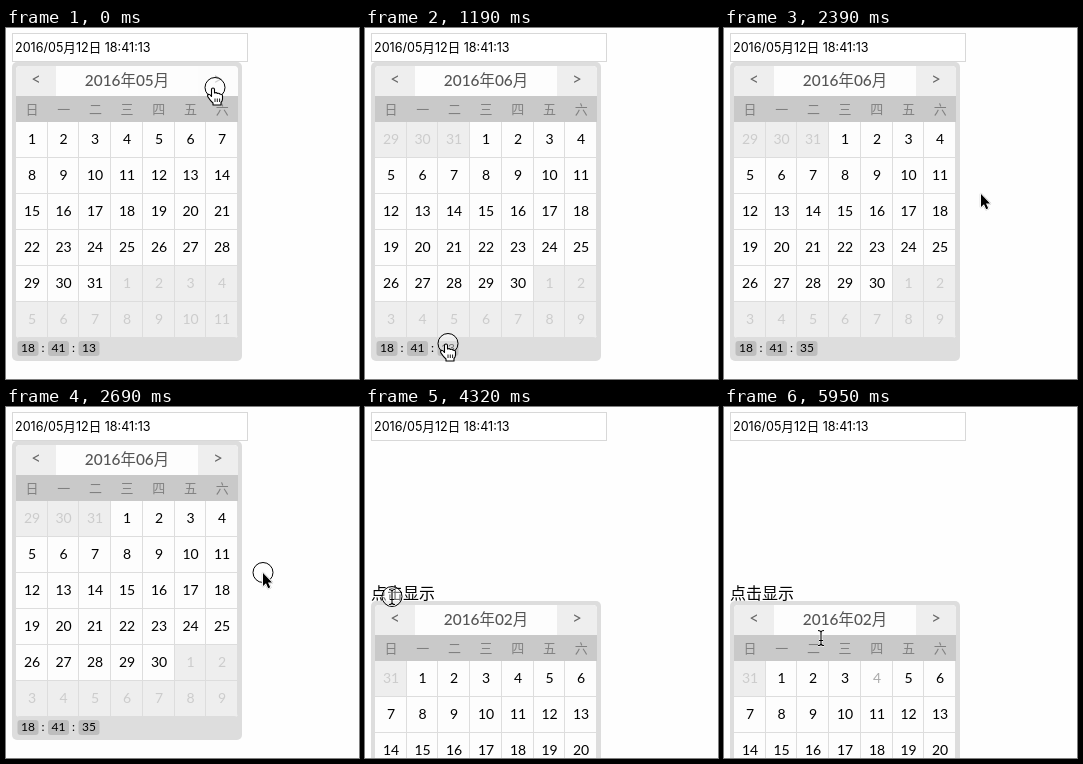
Recreate the animation shown at these times as an HTML page with a canvas. Size 353 by 351 pixels, loop 6.05 s.

```html
<!DOCTYPE html>
<html lang="zh">
<head>
<meta charset="utf-8">
<style>
html, body { margin: 0; height: 100%; overflow: hidden; background: #fefefe; }
canvas { display: block; }
</style>
</head>
<body>
<canvas id="stage" width="353" height="351"></canvas>
<script>
const c = document.getElementById('stage').getContext('2d');
const LOOP = 6050;
const CJK = '"Noto Sans CJK SC", "Noto Sans CJK JP", sans-serif';
const DIGITS = 'Lato, ' + CJK;

// [start ms, pointer, x, y, pressed]
const pointer = [
  [0, 'hand', 209, 60, 1], [150, 'hand', 209, 60], [300, 'hand', 204, 76],
  [440, 'hand', 184, 132], [590, 'hand', 144, 218], [740, 'hand', 104, 292],
  [890, 'hand', 83, 316], [1190, 'hand', 83, 316, 1], [1340, 'hand', 83, 316],
  [1490, 'hand', 96, 167], [1790, 'hand', 96, 167, 1], [1940, 'hand', 96, 167],
  [2090, 'hand', 142, 165], [2240, 'hand', 208, 164], [2390, 'arrow', 257, 166],
  [2690, 'arrow', 257, 166, 1], [2830, 'arrow', 257, 166], [3130, 'arrow', 250, 142],
  [3280, 'arrow', 240, 127], [3430, 'arrow', 91, 204], [3580, 'arrow', 84, 208],
  [3730, 'arrow', 60, 203], [3870, 'arrow', 38, 194], [4020, 'beam', 27, 190],
  [4320, 'beam', 27, 190, 1], [4470, 'beam', 27, 190], [5060, 'hand', 110, 262],
  [5210, 'hand', 169, 318], [5510, 'hand', 169, 318, 1], [5660, 'hand', 169, 318],
  [5950, 'beam', 97, 231]
];

const hand = new Path2D('M-2 7V1.5Q-2 0 -.5 0T1 1.5V5Q3 4 4 5.5Q5.7 4.7 6.6 6.3Q9 6 9 8V11Q9 13 7.5 14.5V17H-.5V15Q-3 13 -5.5 9Q-6.5 7 -5 6.2Q-3.5 6 -2 8.5Z');
const knuckles = new Path2D('M1.5 10.5V14M3.8 10.5V14M6.1 10.5V14');
const arrow = new Path2D('M0 0V13L3 10.3L5.2 15.2L7.2 14.3L5 9.5H9Z');
const beam = new Path2D('M-3-7.5Q0-7.5 0-5.5Q0-7.5 3-7.5M0-5.5V5.5M-3 7.5Q0 7.5 0 5.5Q0 7.5 3 7.5M-2 2.5H2');

function box(x, y, w, h, color, radius = 0) {
  c.fillStyle = color;
  c.beginPath();
  c.roundRect(x, y, w, h, radius);
  c.fill();
}

// Text is centred vertically on y.
function text(str, x, y, size, color = '#000', family = DIGITS, align = 'center', weight = 400) {
  c.font = `${weight} ${size}px ${family}`;
  c.textAlign = align;
  c.fillStyle = color;
  c.fillText(str, x, Math.round(y + size * 0.36));
}

function cell(i, columns, top, height, label, bg, color) {
  const pitch = 222 / columns, col = i % columns;
  const left = Math.round(10 + pitch * col), right = Math.round(10 + pitch * (col + 1));
  const y = top + height * Math.floor(i / columns);
  box(left, y, right - left, height, bg);
  box(left, y + height - 1, right - left, 1, '#ddd');
  box(right - 1, y, 1, height, '#ddd');
  text(label, (left + right) / 2, y + height / 2 - 0.7, 14, color);
}

function month(m, faded, nextHover) {
  box(10, 38, 40, 30, '#eee', [4, 0, 0, 0]);
  box(192, 38, 40, 30, nextHover ? '#fcfcfc' : '#eee', [0, 4, 0, 0]);
  text('<', 30, 51.5, 16.5, '#666');
  text('>', 212, 51.5, 16.5, nextHover ? '#aaa' : '#666');
  text(`2016年0${m}月`, 121, 52.7, 15.4, '#555', DIGITS, 'center', 500);
  box(10, 68, 222, 26, '#c9c9c9');
  [...'日一二三四五六'].forEach((d, i) =>
    text(d, 26 + i * 31.7, 81, 13, '#808080', CJK, 'center', 500));
  const first = new Date(2016, m - 1, 1).getDay();
  for (let i = 0; i < 42; i++) {
    const date = new Date(2016, m - 1, 1 - first + i), day = date.getDate();
    const inside = date.getMonth() === m - 1;
    const color = !inside ? '#ccc' : day === faded ? '#aaa' : '#000';
    cell(i, 7, 94, 36, day, inside ? '#fdfdfd' : '#eee', color);
  }
}

function seconds(hover) {
  for (let i = 0; i < 60; i++)
    cell(i, 8, 38, 29, String(i).padStart(2, '0'), i === hover ? '#d6d6d6' : '#fdfdfd');
}

function panel(top, sec, body) {
  c.save();
  c.translate(0, top - 34);
  box(6, 34, 230, 299, '#ddd', 5);
  box(10, 38, 222, 272, '#fdfdfd', 4);
  c.save();
  c.beginPath();
  c.roundRect(10, 38, 222, 272, 4);
  c.clip();
  body();
  c.restore();
  ['18', '41', sec].forEach((value, i) => {
    const x = 22 + i * 30.5;
    box(x - 10.5, 313, 21, 15, '#bebebe', 3);
    text(value, x, 320, 12);
    if (i < 2) text(':', x + 15, 320, 12);
  });
  c.restore();
}

function outline(path, color, width) {
  c.strokeStyle = color;
  c.lineWidth = width;
  c.stroke(path);
}

function drawPointer([, kind, x, y, pressed]) {
  c.save();
  c.translate(x, y);
  c.lineJoin = 'round';
  if (pressed) {
    const ring = new Path2D();
    ring.arc(0, -0.5, 10, 0, 7);
    c.fillStyle = 'rgba(255,255,255,.45)';
    c.fill(ring);
    outline(ring, '#000', 1);
  }
  if (kind === 'hand') {
    c.translate(-1.5, 0);
    c.fillStyle = '#fff';
    c.fill(hand);
    outline(hand, '#000', 1.1);
    outline(knuckles, '#000', 0.9);
  } else if (kind === 'arrow') {
    outline(arrow, '#bbb', 2.4);
    outline(arrow, '#fff', 1.8);
    c.fillStyle = '#000';
    c.fill(arrow);
  } else {
    outline(beam, '#fff', 2.6);
    outline(beam, '#000', 1.1);
  }
  c.restore();
}

function draw(t) {
  box(0, 0, 353, 351, '#fefefe');
  box(6, 5, 236, 29, '#d8d8d8');
  box(7, 6, 234, 27, '#fff');
  text('2016/05月12日 18:41:13', 9, 19.5, 12.55, '#000', 'Inter, ' + CJK, 'left');
  text('点击显示', 6, 186.5, 16, '#000', CJK, 'left');

  if (t < 2830) {
    const picking = t >= 1340 && t < 1940;
    panel(34, t < 1940 ? '13' : '35', () => {
      if (picking) seconds(t >= 1490 ? 35 : -1);
      else month(t < 150 ? 5 : 6, 0, t < 300);
    });
  } else if (t >= 4320) {
    const faded = t >= 5950 ? 4 : t >= 5210 ? 12 : 0;
    panel(194, '13', () => month(2, faded));
  }
  drawPointer(pointer.findLast(p => p[0] <= t));
}

const start = performance.now();
function tick() {
  draw((performance.now() - start) % LOOP);
  requestAnimationFrame(tick);
}
tick();
</script>
</body>
</html>
```
